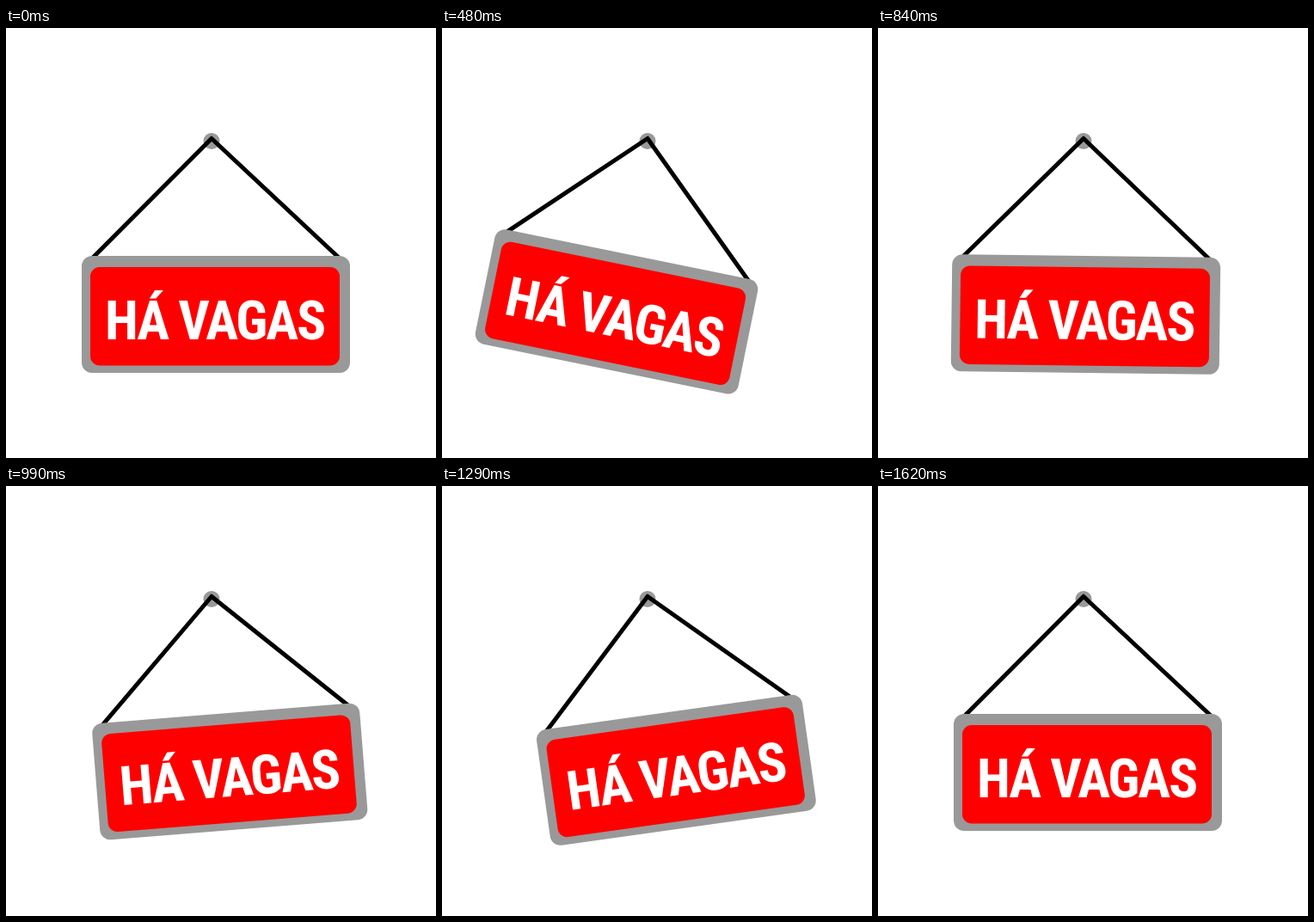
Animation of 500 by 500 pixels, one loop 1.65 s. Source, as an HTML page:

```html
<!DOCTYPE html>
<html lang="pt">
<head>
<meta charset="utf-8">
<title>Há vagas</title>
<style>
html, body { margin: 0; width: 100%; height: 100%; overflow: hidden; background: #fff; }
svg { display: block; width: 100vw; height: 100vh; }
text { font-stretch: 75%; fill: #fff; text-anchor: middle; }
</style>
</head>
<body>
<svg viewBox="0 0 500 500">
  <circle cx="239" cy="131.5" r="9.5" fill="#999"/>
  <g id="sign">
    <path d="M100 268L239 128.5M239 128.5L388 268" fill="none" stroke="#000" stroke-width="5" stroke-linecap="round"/>
    <rect x="88" y="265" width="312" height="136" rx="12" fill="#999"/>
    <rect x="98" y="278" width="290" height="114.500" rx="11" fill="#f00"/>
    <text id="label" x="243.5" y="362">HÁ VAGAS</text>
  </g>
</svg>
<script>
const sign = document.getElementById('sign');
const label = document.getElementById('label');

// family, size giving 45px capitals, weight
const faces = [
  ['Roboto', 63.3, 800],
  ['Open Sans', 63, 800],
  ['Noto Sans', 63, 800],
  ['Roboto Condensed', 63.3, 800],
  ['Liberation Sans Narrow', 65.4, 700],
  ['Noto Sans CJK JP', 61.4, 700]
];
const WIDTH = 255;

function setFace([family, size, weight]) {
  label.style.fontFamily = `"${family}", sans-serif`;
  label.style.fontWeight = weight;
  label.style.fontSize = size + 'px';
  return label.getComputedTextLength();
}

// pick the narrow face whose natural width suits the board best
function chooseFace() {
  const miss = face => Math.abs(setFace(face) - WIDTH);
  const best = faces.map(face => [miss(face), face]).sort((a, b) => a[0] - b[0])[0][1];
  const gap = Math.max(-4, Math.min(3, (WIDTH - setFace(best)) / 8));
  label.style.letterSpacing = gap + 'px';
  const w = label.getComputedTextLength();
  if (w > WIDTH + 8) label.style.fontSize = best[1] * WIDTH / w + 'px';
  label.setAttribute('x', 243.5 + gap / 2);
}

const STEP = 30, STEPS = 55;
// step, angle in degrees
const swing = [[0, 0], [10, 6.9], [17, 12.3], [39, -10.9], [54, 0]];

function angleAt(n) {
  const i = swing.findIndex(([k]) => k >= n);
  if (i === 0) return 0;
  const [n0, a0] = swing[i - 1], [n1, a1] = swing[i];
  return a0 + (a1 - a0) * (n - n0) / (n1 - n0);
}

function draw(ms) {
  const n = Math.floor(ms / STEP) % STEPS;
  sign.setAttribute('transform', `rotate(${angleAt(n)} 239 128.5)`);
}

chooseFace();
draw(0);
let start;
function tick(now) {
  start ??= now;
  draw(now - start);
  requestAnimationFrame(tick);
}
requestAnimationFrame(tick);
</script>
</body>
</html>
```
